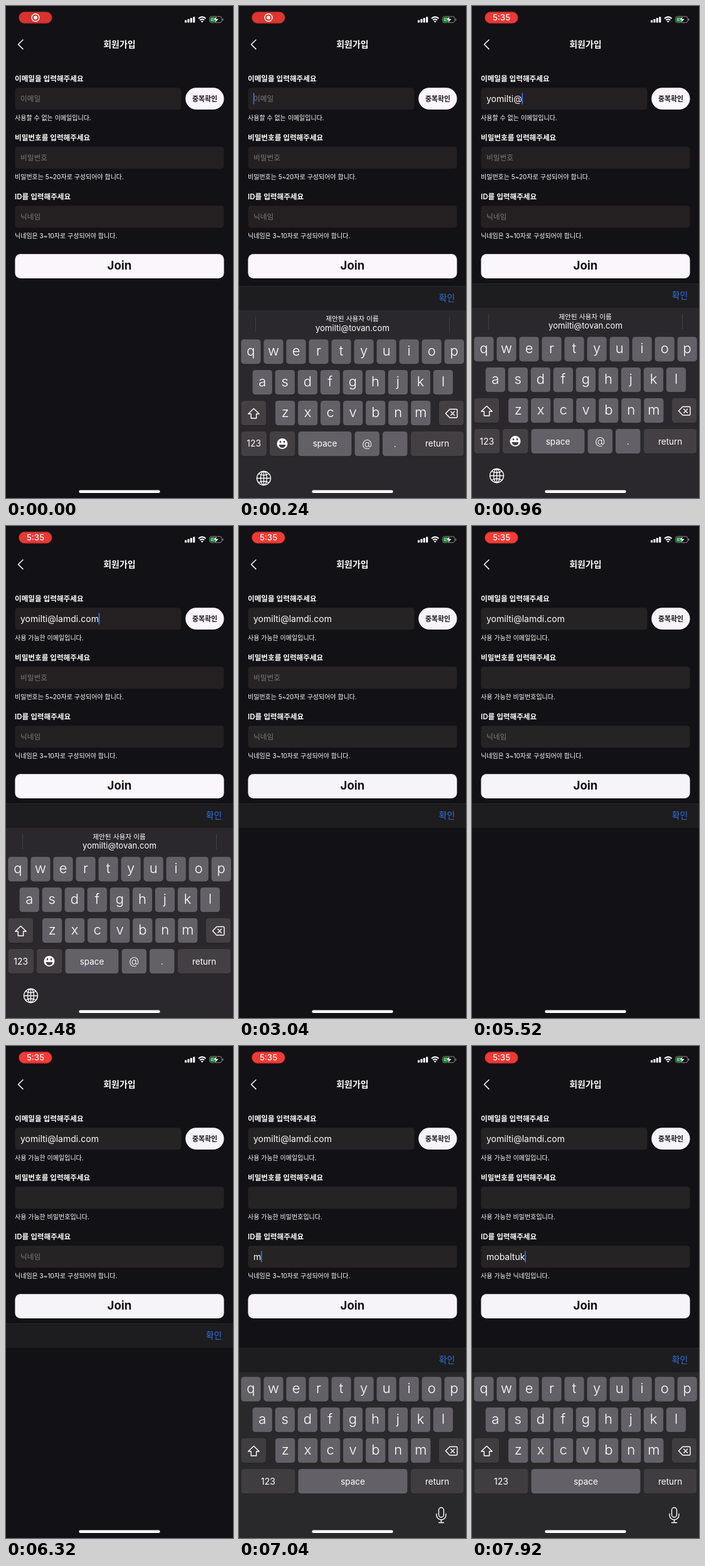
Recreate the animation shown at these times as an HTML page. Size 362x784 px, loop 8000 ms.

```html
<!DOCTYPE html>
<html lang="ko">
<head>
<meta charset="utf-8">
<title>회원가입</title>
<style>
html, body { margin: 0; width: 100%; height: 100%; overflow: hidden; background: #121115; }
svg {
  display: block; width: 362px; height: 784px;
  font-family: Inter, "Noto Sans CJK KR", "Noto Sans CJK", sans-serif;
  --field: #241f21; --btn: #fbf6fc; --dark: #443f43; --key: #636167;
}
text { fill: #fff; white-space: pre; }
.field { fill: var(--field); }
.btn { fill: var(--btn); }
.key { fill: var(--key); }
.dark { fill: var(--dark); }
.shade { fill: #1b1a1d; }
.hint { fill: #7d787b; }
.blue { fill: #2d73e4; }
.ink { fill: #131114; }
.line { fill: none; stroke: #fff; stroke-width: 1.4; stroke-linecap: round; stroke-linejoin: round; }
</style>
</head>
<body>
<svg id="stage" viewBox="0 0 362 784"></svg>
<script>
const LOOP = 8000;
const LEFT = 14.4, WIDE = 333.2;
const stage = document.getElementById('stage');

const rect = (x, y, w, h, r, attrs) =>
  `<rect x="${x}" y="${y}" width="${w}" height="${h}" rx="${r}" ${attrs}/>`;
const text = (x, y, size, str, attrs = '') =>
  `<text x="${x}" y="${y}" font-size="${size}" ${attrs}>${str}</text>`;
const mid = (x, y, size, str, attrs = '') =>
  text(x, y, size, str, `text-anchor="middle" ${attrs}`);
const line = (d, attrs = '') => `<path class="line" d="${d}" ${attrs}/>`;

// Keyboards
const KEY_H = 39.2;
const ROWS = [['qwertyuiop', 3.3, 527.2], ['asdfghjkl', 21.6, 576], ['zxcvbnm', 58, 625]];
const keyAt = {};

const cap = (x, y, w, cls) =>
  rect(x, y + 0.8, w, KEY_H, 4.5, 'class="shade"') +
  rect(x, y, w, KEY_H, 4.5, `class="${cls}"`);

function letterKeys(id) {
  let out = '';
  for (const [chars, x0, y] of ROWS) {
    [...chars].forEach((c, i) => {
      const x = x0 + i * 36.03, w = 31.3;
      keyAt[c] = { x, y, w };
      out += cap(x, y, w, 'key') +
        mid(x + w / 2, y + 26, 22, c, `font-weight="300" data-key="${id}${c}"`);
    });
  }
  return out +
    cap(3.5, 625, 39.5, 'dark') +
    line('M23.5 637.5L14.8 646H19.3V653H27.7V646H32.2Z') +
    cap(319, 625, 39.3, 'dark') +
    line('M336 638.5H346.5Q348 638.5 348 640V650.5Q348 652 346.5 652H336L329.5 645.2Z') +
    line('M337.8 642.3L343.6 648.2M343.6 642.3L337.8 648.2');
}

function wideKey(x, w, label, cls, size = 13.5) {
  return cap(x, 674, w, cls) + mid(x + w / 2, 698.5, size, label);
}

function charKey(x, w, c) {
  keyAt[c] = { x, y: 674, w };
  return cap(x, 674, w, 'key') +
    mid(x + w / 2, 699, 16.5, c, `font-weight="300" data-key="e${c}"`);
}

const emoji = cap(49, 674, 40.5, 'dark') +
  `<circle cx="69" cy="693.5" r="8.5" fill="#fff"/>
   <g class="dark"><ellipse cx="66" cy="690.5" rx="1.2" ry="1.8"/><ellipse cx="72" cy="690.5" rx="1.2" ry="1.8"/>
   <path d="M63.5 695H74.5Q73.5 700 69 700T63.5 695Z"/></g>`;

const globe = `<g class="line" style="stroke-width:1.3"><circle cx="39.5" cy="748.5" r="11"/>
  <ellipse cx="39.5" cy="748.5" rx="5" ry="11"/>
  <path d="M39.5 737.5V759.5M28.5 748.5H50.5M31.5 741.5Q39.5 746 47.5 741.5M31.5 755.5Q39.5 751 47.5 755.5"/></g>`;

const mic = rect(318.5, 735.5, 8, 15.5, 4, 'class="line"') +
  line('M315 745.5V747.5A7.5 7.5 0 0 0 330 747.5V745.5M322.5 755V759.5M318.5 759.5H326.5');

const bar = y => rect(0, y, 362, 39, 0, 'fill="#1d1c1f"') +
  rect(0, y, 362, 0.7, 0, 'fill="#2b2a2d"') +
  mid(331.5, y + 24, 13.9, '확인', 'class="blue"');

const emailPad = bar(442) + rect(0, 481, 362, 303, 0, 'fill="#2a282c"') +
  rect(26, 491, 0.8, 24, 0, 'fill="#48464a"') + rect(335, 491, 0.8, 24, 0, 'fill="#48464a"') +
  mid(180.5, 498.5, 10.7, '제안된 사용자 이름') +
  mid(181, 514, 13.1, 'yomilti@tovan.com') +
  letterKeys('e') +
  wideKey(3.5, 40.5, '123', 'dark', 14) + emoji +
  wideKey(94.5, 85, 'space', 'key') +
  charKey(184.5, 39.5, '@') + charKey(229, 39.5, '.') +
  wideKey(274, 84.3, 'return', 'dark') + globe;

const idPad = bar(481) + rect(0, 520, 362, 264, 0, 'fill="#29282b"') + letterKeys('n') +
  wideKey(3.5, 86, '123', 'dark', 14) +
  wideKey(94.5, 174, 'space', 'key') +
  wideKey(274, 84.3, 'return', 'dark') + mic;

// Form
function row(y, w, label, id) {
  return text(14, y - 10.2, 11.6, label, 'font-weight="600"') +
    rect(LEFT, y, w, 35, 4.5, 'class="field"') +
    text(23, y + 22, 11.7, '', `class="hint" id="${id}Hint"`) +
    text(23, y + 23, 14, '', `id="${id}"`) +
    text(14, y + 52, 10, '', `id="${id}Msg"`);
}

const bars = [0, 1, 2, 3].map(i =>
  rect(285 + i * 4.4, 22.6 - i * 1.8, 3.1, 4 + i * 1.8, 0.8, 'fill="#fff"')).join('');

const statusBar = rect(20.4, 9.2, 53, 18.6, 9.3, 'id="pill" stroke="#6e2524" stroke-width="0.8"') +
  mid(47, 23.2, 13.2, '5:35', 'id="clock" font-weight="500"') +
  `<g id="rec"><circle cx="47" cy="18.5" r="6" fill="none" stroke="#fff" stroke-width="1.5"/>
   <circle cx="47" cy="18.5" r="3" fill="#fff"/></g>` + bars +
  line('M307 20Q312.7 14.8 318.4 20', 'style="stroke-width:2.2;stroke-linecap:butt"') +
  line('M309.3 22.5Q312.7 19.5 316.1 22.5', 'style="stroke-width:2;stroke-linecap:butt"') +
  `<path d="M310.7 24.3Q312.7 22.7 314.7 24.3L312.7 26.5Z" fill="#fff"/>` +
  rect(324.5, 16.7, 19.5, 9.8, 3, 'fill="none" stroke="#8b898d" stroke-width="1"') +
  rect(326, 18.2, 8, 6.8, 1.5, 'fill="#35c759"') +
  rect(345, 20, 1.4, 3.5, 0.7, 'fill="#8b898d"') +
  `<path d="M336.5 16L330 22.3H334L332.5 27.3L339.5 20.5H335.2Z" fill="#fff" stroke="#121115" stroke-width="0.6"/>`;

stage.innerHTML = rect(0, 0, 362, 784, 0, 'fill="#121115"') + statusBar +
  line('M27 54L19.5 61.3L27 68.6', 'style="stroke-width:1.5"') +
  mid(181, 66, 14, '회원가입', 'font-weight="600"') +
  row(130.2, 265, '이메일을 입력해주세요', 'email') +
  row(224.2, WIDE, '비밀번호를 입력해주세요', 'pass') +
  row(318.2, WIDE, 'ID를 입력해주세요', 'nick') +
  rect(286.2, 130.3, 61.4, 34.7, 17.35, 'class="btn"') +
  mid(317, 151.5, 10.9, '중복확인', 'class="ink" font-weight="700"') +
  rect(LEFT, 395.2, WIDE, 38.8, 8.5, 'class="btn"') +
  mid(181, 419.7, 18.6, 'Join', 'class="ink" font-weight="700"') +
  rect(0, 138, 1.8, 18.5, 0.9, 'id="caret" fill="#2f6fe8"') +
  `<g id="emailPad">${emailPad}</g><g id="passPad">${bar(442)}</g><g id="idPad">${idPad}</g>` +
  `<g id="pop"><path class="key"/>${mid(0, 0, 32, '', 'font-weight="300"')}</g>` +
  rect(116.3, 771.4, 129.4, 4.7, 2.35, 'fill="#fff"');

const el = {};
stage.querySelectorAll('[id]').forEach(n => el[n.id] = n);
const glyphs = {};
stage.querySelectorAll('[data-key]').forEach(n => glyphs[n.dataset.key] = n);
const show = (n, on) => { n.style.display = on ? '' : 'none'; };
const put = (n, s) => { if (n.textContent !== s) n.textContent = s; };

// Typed runs: pad, text, time of first letter, gap
const RUNS = [
  ['e', 'yomilti@', 340, 75],
  ['e', 'lamdi.com', 1100, 150],
  ['n', 'm', 6990, 0],
  ['n', 'obaltuk', 7140, 115]
];
const strokes = RUNS.flatMap(([pad, str, start, gap]) =>
  [...str].map((c, i) => ({ pad, c, at: start + i * gap })));
const typed = (pad, t) =>
  strokes.filter(s => s.pad === pad && t >= s.at).map(s => s.c).join('');

// Shade of the recording pill: time, red, green, blue
const PILL = [
  [0, 217, 51, 47], [960, 233, 57, 53], [2480, 232, 57, 54],
  [4160, 252, 60, 52], [5520, 248, 59, 54], [7040, 243, 57, 53], [8000, 240, 56, 52]
];
function pillColor(t) {
  const i = Math.max(1, PILL.findIndex(p => p[0] > t));
  const a = PILL[i - 1], b = PILL[i];
  const k = (t - a[0]) / (b[0] - a[0]);
  return `rgb(${[1, 2, 3].map(j => Math.round(a[j] + (b[j] - a[j]) * k))})`;
}

function drawPop(t) {
  const hit = strokes.find(s => t >= s.at - 55 && t < s.at + 10);
  for (const k in glyphs) show(glyphs[k], !hit || k !== hit.pad + hit.c);
  show(el.pop, hit);
  if (!hit) return;
  const { x, y, w } = keyAt[hit.c];
  const l = x - 12, r = x + w + 12, e = x + w, b = y + KEY_H;
  el.pop.firstChild.setAttribute('d',
    `M${l + 8} ${y - 50}H${r - 8}Q${r} ${y - 50} ${r} ${y - 42}V${y - 14}` +
    `C${r} ${y - 5} ${e} ${y - 7} ${e} ${y + 4}V${b - 4.5}Q${e} ${b} ${e - 4.5} ${b}` +
    `H${x + 4.5}Q${x} ${b} ${x} ${b - 4.5}V${y + 4}` +
    `C${x} ${y - 7} ${l} ${y - 5} ${l} ${y - 14}V${y - 42}Q${l} ${y - 50} ${l + 8} ${y - 50}Z`);
  const label = el.pop.lastChild;
  label.setAttribute('x', x + w / 2);
  label.setAttribute('y', y - 17);
  put(label, hit.c);
}

function render(t) {
  const secure = t >= 2600, last = t >= 6500;
  const email = typed('e', t), nick = typed('n', t);

  stage.style.setProperty('--field', secure ? '#252323' : '#241f21');
  stage.style.setProperty('--btn', secure ? '#f6f4f8' : '#fbf6fc');
  stage.style.setProperty('--dark', secure ? '#3f3d40' : '#443f43');
  el.pill.setAttribute('fill', pillColor(t));
  show(el.rec, t < 480);
  show(el.clock, t >= 480);

  put(el.email, email);
  put(el.emailHint, email ? '' : '이메일');
  put(el.emailMsg, t >= 2150 ? '사용 가능한 이메일입니다.' : '사용할 수 없는 이메일입니다.');
  put(el.passHint, t >= 3100 ? '' : '비밀번호');
  put(el.passMsg, t >= 3760 ? '사용 가능한 비밀번호입니다.' : '비밀번호는 5~20자로 구성되어야 합니다.');
  put(el.nick, nick);
  put(el.nickHint, nick ? '' : '닉네임');
  put(el.nickMsg, nick.length >= 3 ? '사용 가능한 닉네임입니다.' : '닉네임은 3~10자로 구성되어야 합니다.');

  const field = last ? el.nick : el.email;
  const width = field.textContent ? field.getComputedTextLength() : 0;
  show(el.caret, t >= 60 && (!secure || last));
  el.caret.setAttribute('x', 23 + width - 0.3);
  el.caret.setAttribute('y', last ? 326.5 : 138.5);

  const k = Math.min(1, Math.max(0, (t - 40) / 260));
  el.emailPad.setAttribute('transform', `translate(0 ${342 * (1 - k) ** 3})`);
  show(el.emailPad, t >= 40 && !secure);
  show(el.passPad, secure && !last);
  show(el.idPad, last);
  drawPop(t);
}

const start = performance.now();
function tick() {
  render((performance.now() - start) % LOOP);
  requestAnimationFrame(tick);
}
tick();
</script>
</body>
</html>
```
